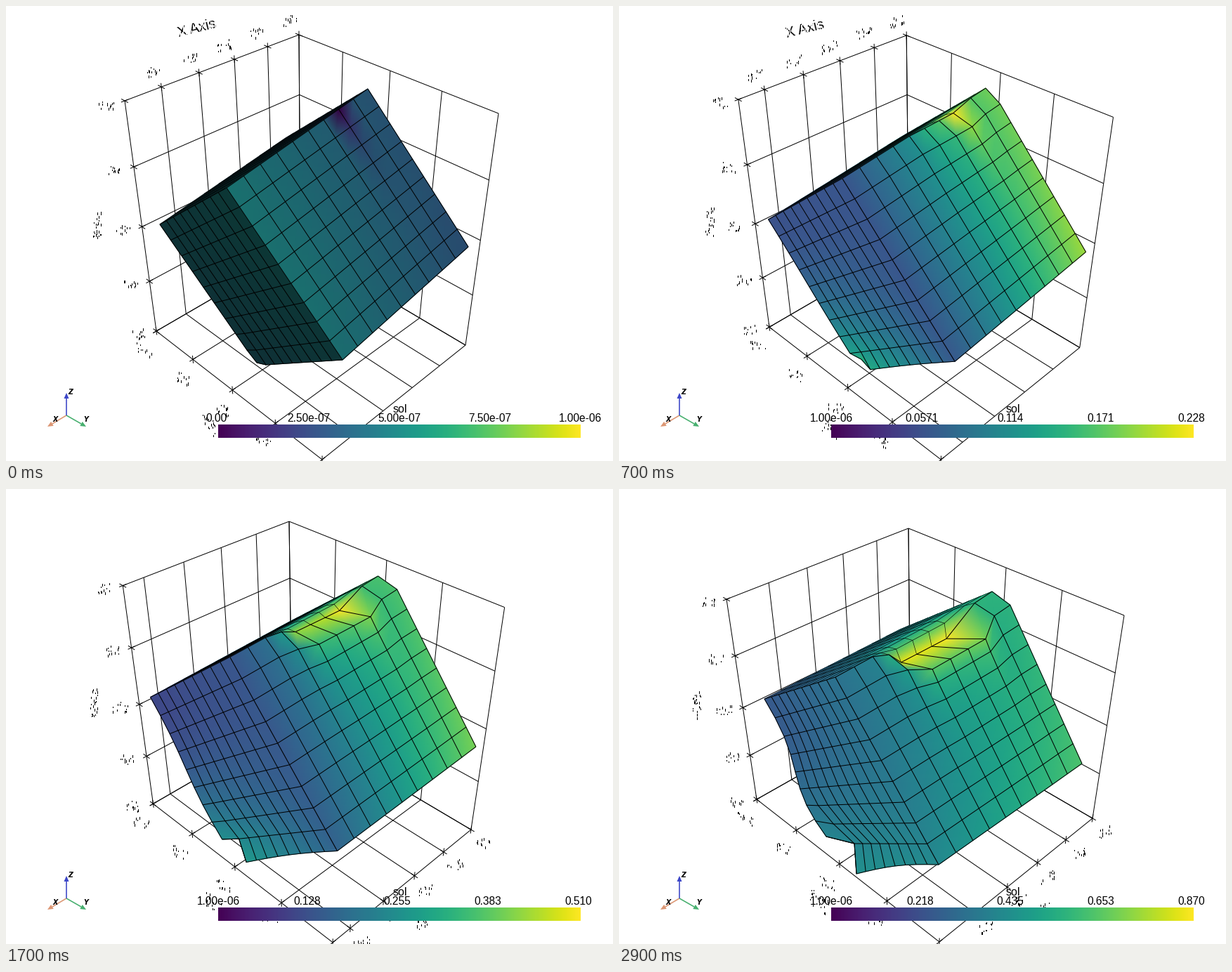
Animation, 864 px wide and 648 px high, one loop 3000 ms. Source, as a matplotlib script:

```python
import numpy as np
import matplotlib.pyplot as plt
from matplotlib.animation import FuncAnimation
from matplotlib.collections import LineCollection
from matplotlib.colors import ListedColormap
from matplotlib.tri import Triangulation

W, H, FRAMES, N = 864, 648, 30, 10
HOLD, LAST, MID = 2, 29, .407
SANS = 'Liberation Sans'

# Each corner glides along a parabola through three places: start, middle, end.
BOX = dict(
    tb=[(417, 41), (404, 44), (412, 56)],
    tl=[(169, 135), (168.5, 134.5), (153, 157)],
    tr=[(701, 153), (707, 164.5), (719, 180)],
    bl=[(214, 463), (212, 451.5), (196, 442)],
    bf=[(450, 646), (464, 646), (456, 645)],
    br=[(654, 483), (659, 487), (674, 469)],
)
BODY = dict(
    l=[(219, 311), (207.5, 298.5), (207, 299)],
    a=[(314, 259), (319.5, 238.5), (308, 268)],
    b=[(515, 118), (538, 112.5), (544, 137)],
    c=[(658, 343), (668.5, 360), (659, 391)],
    d=[(398, 188), (404, 187), (400, 200)],
    e=[(479, 504), (475, 511), (455, 535)],
    left8=[(343, 490), (315, 498), (295, 495)],
    near8=[(356, 490), (335, 496), (335, 505)],
    near9=[(370, 511), (347, 526), (338, 548)],
)
FIRST_TICK = [.186, .11, .205]

# Field at the corners: near ones rise at once, far ones only later (rate, power)
GROWTH = dict(b=(.034, .82), c=(.0384, .82), g=(.0258, .82),
              l=(.00026, 2), a=(.00038, 2), e=(.00049, 2))
AT_REST = dict(b=.33, c=.30, g=.42, l=.45, a=.50, e=.48)


def along(path, i):
    m = max(i - HOLD, 0) / (LAST - HOLD)
    p, q, r = np.array(path, float)
    return (p * (m - MID) * (m - 1) / MID + q * m * (m - 1) / (MID * (MID - 1))
            + r * m * (m - MID) / (1 - MID))


def bilinear(p00, p10, p01, p11, u, v):
    return (1 - v) * ((1 - u) * p00 + u * p10) + v * ((1 - u) * p01 + u * p11)


def cross(p, q):
    return p[0] * q[1] - p[1] * q[0]


def meet(p, q, r, s):
    d, e = q - p, s - r
    return p + d * cross(r - p, e) / cross(d, e)


def perspective(p00, p10, p01, p11):
    s, d1, d2 = p00 - p10 + p11 - p01, p10 - p11, p01 - p11
    g, h = cross(s, d2) / cross(d1, d2), cross(d1, s) / cross(d1, d2)
    a, b = p10 - p00 + g * p10, p01 - p00 + h * p01
    return lambda u, v: (p00 + a * u + b * v) / (1 + g * u + h * v)


# Mesh spacing, foreshortened away from the front ridge
COL = np.arange(N)
I = COL / (N - 1)
U, V = np.meshgrid(I, I)
RIGHT = I * 1.1 / (1 + .1 * I)
LEFT = I / (1.14 - .14 * I)
AFTER_FIRST = (LEFT[1:] - LEFT[1]) / (1 - LEFT[1])
RU = np.tile(RIGHT, (N, 1))[..., None]
TV = (1 - LEFT[::-1])[:, None, None]

TRIS = [t for r in range(N - 1) for c in range(N - 1)
        for p in [r * N + c]
        for t in ((p, p + 1, p + N), (p + 1, p + N + 1, p + N))]

# Nodes touched by the press, which starts at column 7 and spreads to column 4
CONTACT = np.clip(np.minimum((COL - 2.5) / 1.5, (8.1 - COL) / 1.1), 0, 1)
TOUCH = HOLD + 1.67 * np.clip(7 - COL, 0, None)
DEPTH = np.column_stack([-2.7 * COL, 28 + 2 * COL])

VIRIDIS = plt.get_cmap('viridis')(np.linspace(0, 1, 256))


def shaded(k):
    return ListedColormap(VIRIDIS * [k, k, k, 1])


LIT, DIM, DARK = shaded(1), shaded(.78), shaded(.38)

fig = plt.figure(figsize=(W / 72, H / 72), dpi=72, facecolor='white')
ax = fig.add_axes([0, 0, 1, 1])


def lines(segs, width=1, color='black', z=1, smooth=True):
    ax.add_collection(LineCollection(segs, linewidths=width, colors=[color],
                                     zorder=z, antialiaseds=smooth), autolim=False)


def surface(nodes, values, cmap, z, width=1):
    flat = nodes.reshape(-1, 2)
    ax.tripcolor(Triangulation(flat[:, 0], flat[:, 1], TRIS), np.clip(values, 0, 1).ravel(),
                 shading='gouraud', cmap=cmap, vmin=0, vmax=1, zorder=z)
    lines(list(nodes) + list(nodes.transpose(1, 0, 2)), width, z=z + .1)


def peak(i):
    """Upper end of the scale: a steady climb with one short overshoot."""
    return .03 * i + .0183 * np.exp(-((i - 7) / 1.5) ** 2)


def spread(i):
    return np.clip((i - TOUCH) / (LAST - TOUCH), 0, 1)


def side_nodes(i, p, ridge):
    v = (COL / 8)[:, None]
    bend = 6 * (i / LAST) ** 2 * np.hstack([np.sin(2 * np.pi * v), np.sin(np.pi * v)])
    left = p['l'] + (p['left8'] - p['l']) * v + bend
    first = left + (ridge - left) * LEFT[1]
    # The cells next to the pinned corner stretch
    first += (p['near8'] - first[8]) * np.clip((COL - 5) / 3, 0, 1)[:, None] ** 2
    first[9] = p['near9']
    left[9] = p['near8'] + np.array([1, 18]) * np.clip(1 - (i - HOLD) / 12, 0, 1)

    side = np.empty((N, N, 2))
    side[:, 0] = left
    side[:, 1:] = first[:, None] + (ridge - first)[:, None] * AFTER_FIRST[:, None]
    side[9, 1:, 1] -= 5 * i / LAST * np.sin(np.pi * AFTER_FIRST)
    return side


def block_nodes(i):
    p = {k: along(path, i) for k, path in BODY.items()}
    t = spread(i)
    push = (CONTACT * t * (1.2 - .2 * t))[:, None]
    corner = p['b'] + np.array([-13, 9]) * np.clip((i - HOLD) / 12, 0, 1)

    right = bilinear(p['a'], p['b'], p['e'], p['c'], RU, V[..., None])
    ridge = right[:, 0].copy()
    right[0] = p['a'] + (corner - p['a']) * RIGHT[:, None] + push * DEPTH
    top = bilinear(p['a'], corner, p['l'], p['d'], RU, TV)
    for r in range(N):
        top[r] += push * DEPTH * .33 ** r
        if r:
            right[r] += push * (13, 21) * .5 ** (r - 1)
    return top, side_nodes(i, p, ridge), right


def block_field(i):
    n = max(i, HOLD)
    if i:
        f = {k: (.051 + rate * (n - HOLD) ** power) / peak(n)
             for k, (rate, power) in GROWTH.items()}
    else:
        f = AT_REST
    edge = f['a'] + (f['b'] - f['a']) * I
    heat = CONTACT * .93 * np.clip(1.3 * spread(i) ** .7, 0, 1)
    heat[7] = 1
    extra = heat * ((1 if i else 0) - edge) * .5 ** COL[:, None]

    right = bilinear(f['a'], f['b'], f['e'], f['c'], U, V ** 2) + extra
    top = bilinear(f['a'], f['b'], f['l'], (f['l'] + f['b']) / 2, U, V) + extra
    side = bilinear(f['l'], f['a'], f['g'], f['e'], U, V ** 2)
    if 0 < i <= 4:
        side[9, 0] = 0
    return top, side, right


def block(i):
    cmaps = (LIT, LIT, LIT) if i else (DARK, DARK, DIM)
    faces = zip(block_nodes(i), block_field(i), cmaps, (3, 4, 5), (.6, 1, 1))
    for nodes, values, cmap, z, width in faces:
        surface(nodes, values, cmap, z, width)


def specks(rng, center, n=12, w=11, h=7, slope=0.):
    """Broken remains of a label: short upright strokes."""
    x = np.round(rng.uniform(-w, w, n))
    y = np.round(rng.uniform(-h, h, n) + slope * x)
    size = rng.integers(1, 4, n)
    cx, cy = np.round(center) + .5
    lines([[(cx + a, cy + b), (cx + a, cy + b + s)] for a, b, s in zip(x, y, size)],
          1, z=2, smooth=False)


def broken_title(rng, cx, cy):
    ax.text(cx, cy, 'X Axis', family=SANS, fontsize=20, rotation=14,
            ha='center', va='center', zorder=2)
    gaps = np.round(rng.uniform(-28, 28, 44)) + round(cx) + .5
    tops = rng.uniform(-16, 12, 44) + cy
    lines([[(x, y), (x, y + 6)] for x, y in zip(gaps, tops)], 1, 'white', 2.1, False)


def axes_box(i):
    tb, tl, tr, bl, bf, br = (along(path, i) for path in BOX.values())
    vx, vy, vz = meet(tl, tb, bf, br), meet(tb, tr, bl, bf), meet(tl, bl, tr, br)
    bb = meet(bl, vx, br, vy)
    wall_l, wall_r = perspective(tl, tb, bl, bb), perspective(tb, tr, bb, br)
    floor = perspective(bl, bb, bf, br)

    quarters = np.arange(5) / 4
    first = along(FIRST_TICK, i)
    xs = first + (1 - first) * quarters
    segs = []
    for face, us in ((wall_l, [0, *xs]), (wall_r, quarters), (floor, [0, *xs])):
        segs += [(face(u, 0), face(u, 1)) for u in us]
        segs += [(face(0, v), face(1, v)) for v in quarters]
    lines(segs)

    rng = np.random.default_rng(100 + i)
    marks = []

    def tick(point, away, offset, slope=0.):
        for v in away:
            d = (v - point) / np.hypot(*(v - point)) * 5.5
            marks.append((point - d, point + d))
        specks(rng, point + offset, slope=slope)

    for q in quarters:
        tick(wall_l(0, q), (vx, vy), (-28, 2))
        tick(floor(0, q), (vx, vz), (-18, 25), .4)
    on_top = i < 14
    for x in xs:
        if on_top:
            tick(wall_l(x, 0), (vy, vz), (-15, -22), -.25)
        else:
            tick(floor(x, 1), (vy, vz), (15, 18), -.4)
    lines(marks)

    specks(rng, wall_l(0, .5) + (-66, -4), 24, 6, 20)
    specks(rng, floor(0, .5) + (-30, 52), 22, 14, 12, .6)
    if on_top:
        broken_title(rng, *(tb + (-145, -9)))
    else:
        specks(rng, floor(xs[2], 1) + (10, 66), 16, 7, 11)


def arrow(tip, color):
    start, tip = np.array([86, 583.]), np.array(tip, float)
    d = (tip - start) / np.hypot(*(tip - start))
    n = np.array([-d[1], d[0]])
    neck = tip - d * 8
    lines([(start, neck)], 1.6, color, 6)
    ax.add_patch(plt.Polygon([tip, neck + n * 3.5, neck - n * 3.5], color=color, lw=0, zorder=6))


def triad():
    arrow((59, 599), '#dc9673')
    arrow((114, 599), '#46af6e')
    arrow((86, 551), '#3c46c8')
    for x, y, s in ((70, 589, 'X'), (114, 589, 'Y'), (91.5, 550, 'Z')):
        ax.text(x, y, s, family='DejaVu Sans', fontsize=9.5, weight='bold', style='italic',
                ha='center', va='center', zorder=7)


def scale_bar(i):
    ax.imshow(np.linspace(0, 1, 256)[None], cmap='viridis', extent=(302, 817.5, 615, 596),
              aspect='auto', interpolation='nearest', zorder=8)
    low, high = (1e-6, peak(i)) if i else (0, 1e-6)
    for k in range(5):
        s = '%#.3g' % (low + (high - low) * k / 4)
        x = 302.5 + 128.7 * k - (3 if len(s) < 6 else 0)
        ax.text(x, 591.5, s, family=SANS, fontsize=15.5, ha='center', va='baseline', zorder=9)
    ax.text(561, 579, 'sol', family=SANS, fontsize=16, ha='center', va='baseline', zorder=9)


def draw(i):
    ax.clear()
    ax.axis('off')
    ax.set_autoscale_on(False)
    axes_box(i)
    block(i)
    triad()
    scale_bar(i)
    ax.set_xlim(0, W)
    ax.set_ylim(H, 0)
    return []


anim = FuncAnimation(fig, draw, frames=FRAMES, interval=100, repeat=True, repeat_delay=0,
                     init_func=lambda: [])
plt.show()
```
